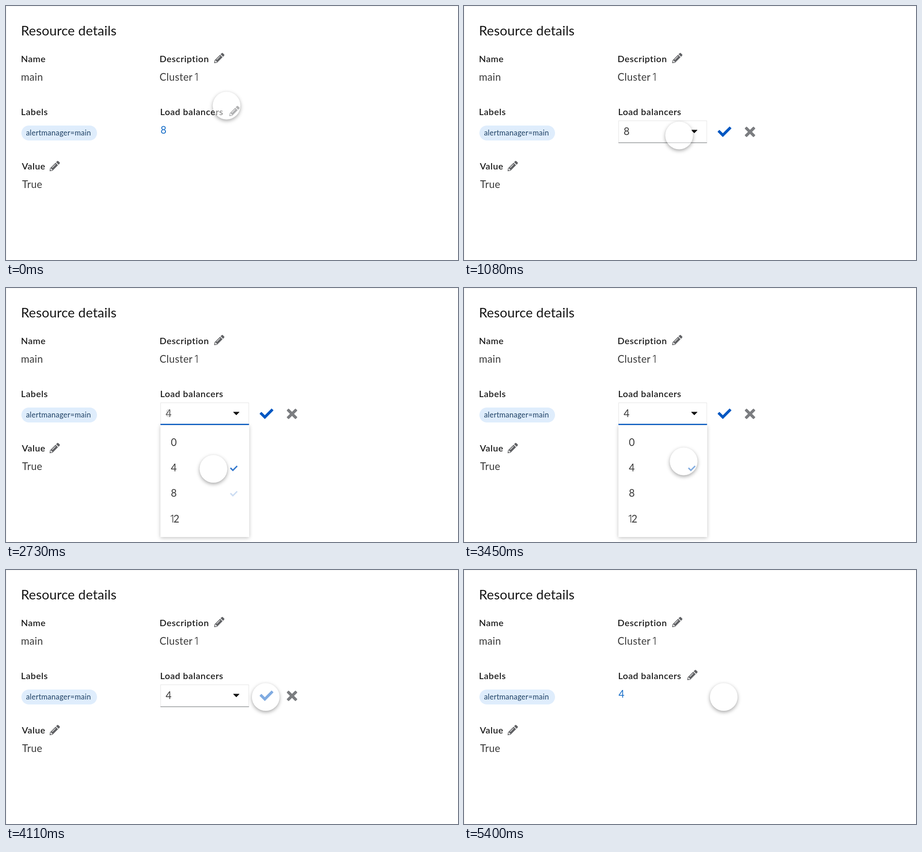
These frames come from a looping animation (998 by 561 pixels, 6210 ms). An HTML page:

```html
<!DOCTYPE html>
<html lang="en">
<head>
<meta charset="utf-8">
<title>Inline edit</title>
<style>
  html, body { margin: 0; width: 100%; height: 100%; overflow: hidden; background: #fff; }
  svg { position: absolute; left: 0; top: 0; display: block; }
  text { font: 400 22.4px Lato, "Open Sans", sans-serif; letter-spacing: .4px; fill: #3a3a3a; }
  .title { font-size: 29.3px; letter-spacing: .15px; fill: #151515; }
  .label { font-size: 20px; font-weight: 600; letter-spacing: .62px; fill: #1b1b1b; }
  .chip { font-size: 16.4px; letter-spacing: .28px; fill: #1c3f63; }
  .link { fill: #1a6fc8; }
  .one { font-family: Inter, sans-serif; font-weight: 300; }
  #menu rect { filter: drop-shadow(0 2px 4px rgba(0, 0, 0, .24)); }
  #cursor {
    position: absolute; left: -30.5px; top: -30.5px; width: 61px; height: 61px;
    border-radius: 50%; background: rgba(255, 255, 255, .5);
    box-shadow: 0 3px 8px rgba(0, 0, 0, .36);
  }
</style>
</head>
<body>
<svg width="998" height="561" viewBox="0 0 998 561">
  <defs>
    <g id="pencil" transform="scale(.445)" fill="#5f6063" stroke-linejoin="round" stroke-linecap="round">
      <g stroke="#5f6063" stroke-width="1.6">
        <path d="M29.2 10.6L3 36.8 .9 50.3 14.4 48.2 40.6 22z"/>
        <path d="M44.3 18.2L33 6.9 37.5 2.2Q40.3 -.4 43.2 2.2L49 8Q51.6 10.8 49 13.7z"/>
      </g>
      <path d="M13.4 33L28.8 17.6" stroke="#fff" stroke-width="2.8"/>
      <path d="M8.8 42.4h4.8v3.6L7.1 47.2 4 44 5.2 37.6h3.6z" fill="#fff"/>
    </g>
    <path id="tick" d="M-249.6 -1L-194.2 -56.5 -64 73.7 194.2 -184.5 249.6 -129 -64 184.5z"
      fill="#0057c2" stroke="#0057c2" stroke-width="24" stroke-linejoin="round"/>
    <rect id="bar" x="-13.8" y="-3.15" width="27.6" height="6.3" rx="1.3" fill="#7b7d80"/>
  </defs>

  <rect width="998" height="561" fill="#fff"/>
  <path d="M0 .5H998M.5 0V561" stroke="#f0f0f0"/>

  <text class="title" x="33" y="64.5">Resource details</text>
  <text class="label" x="33" y="124">Name</text>
  <text x="33" y="165">main</text>
  <text class="label" x="339" y="124">Description</text>
  <text x="339" y="165">Cluster</text>
  <text class="one" x="416" y="165">1</text>
  <use href="#pencil" transform="translate(459.5 103.5)"/>

  <text class="label" x="33" y="241">Labels</text>
  <rect x="34" y="264" width="167" height="33" rx="16.5" fill="#dfedfc"/>
  <text class="chip" x="44.2" y="286.3">alertmanager=main</text>
  <text class="label" x="340.3" y="241">Load balancers</text>

  <text class="label" x="35" y="361">Value</text>
  <use href="#pencil" transform="translate(96.3 342)"/>
  <text x="35.5" y="402">True</text>

  <g id="view">
    <use href="#pencil" transform="translate(493 220.5)"/>
    <text class="link" id="shown" x="341.3" y="282">8</text>
  </g>

  <g id="edit">
    <rect x="341.5" y="253.5" width="194.5" height="48.5" fill="#fff" stroke="#e4e4e4"/>
    <path d="M341 302H536.5" stroke="#6a6e73" stroke-width="1.2"/>
    <path d="M502 274H515L508.5 280.5z" fill="#151515" stroke="#151515" stroke-linejoin="round"/>
    <use href="#tick" transform="translate(575.2 277.8) scale(.0582)"/>
    <g transform="translate(631.5 278)">
      <use href="#bar" transform="rotate(45)"/>
      <use href="#bar" transform="rotate(-45)"/>
    </g>
    <text id="old" x="352.5" y="285">8</text>
    <text id="new" x="352.5" y="285">4</text>
  </g>

  <g id="menu">
    <rect x="341" y="302.5" width="196" height="247.5" fill="#fff"/>
    <path d="M341 301.3H536.5" stroke="#0057c2" stroke-width="2.6"/>
    <text x="364" y="349.3">0</text>
    <text x="364" y="405.3">4</text>
    <text x="364" y="461.3">8</text>
    <text class="one" x="362.5" y="518.3">1</text>
    <text x="369.8" y="518.3">2</text>
    <use id="tickOld" href="#tick" transform="translate(503 454.5) scale(.0325)"/>
    <use id="tickNew" href="#tick" transform="translate(503 398.5) scale(.0325)"/>
  </g>
</svg>
<div id="cursor"></div>

<script>
const LOOP = 6210, STEP = 30;
const $ = id => document.getElementById(id);

// Cursor stops: time, x, y, and whether the move into the stop slows down
const stops = [
  [0, 486.5, 219.5], [90, 504, 235, 1], [870, 504, 235],
  [1080, 474.5, 285.5, 1], [1230, 474.5, 285.5], [1320, 481, 285.5, 1],
  [2130, 481, 285.5], [2160, 482, 302], [2400, 457.5, 399, 1],
  [3390, 457.5, 399], [3450, 484.5, 382.5], [3780, 540.5, 295.5],
  [4020, 573, 280, 1], [4440, 573, 280], [4590, 558.5, 280.5, 1],
  [4980, 573, 280, 1], [LOOP, 573, 280]
];

const ramp = (t, from, to) => Math.min(1, Math.max(0, (t - from) / (to - from)));
const fade = (id, value) => { $(id).style.opacity = value; };

function cursorAt(t) {
  const i = stops.findIndex(s => s[0] > t);
  const [t0, x0, y0] = stops[i - 1];
  const [t1, x1, y1, slow] = stops[i];
  let p = ramp(t, t0, t1);
  if (slow) p = 1 - (1 - p) ** 2;
  return [x0 + (x1 - x0) * p, y0 + (y1 - y0) * p];
}

function draw(t) {
  const editing = ramp(t, 510, 660) - ramp(t, 4650, 4800);
  const open = ramp(t, 1530, 1710) - ramp(t, 4020, 4110);
  const picked = ramp(t, 2610, 2760);
  const [x, y] = cursorAt(t);

  fade("view", 1 - editing);
  fade("edit", editing);
  fade("menu", open);
  fade("old", 1 - picked);
  fade("tickOld", 1 - picked);
  fade("new", picked);
  fade("tickNew", picked);
  $("shown").textContent = picked < 1 ? "8" : "4";
  $("cursor").style.transform = `translate(${x}px, ${y}px)`;
}

let start;
function tick(now) {
  start ??= now;
  const t = (now - start) % LOOP;
  draw(Math.floor(t / STEP) * STEP);
  requestAnimationFrame(tick);
}
draw(0);
requestAnimationFrame(tick);
</script>
</body>
</html>
```
